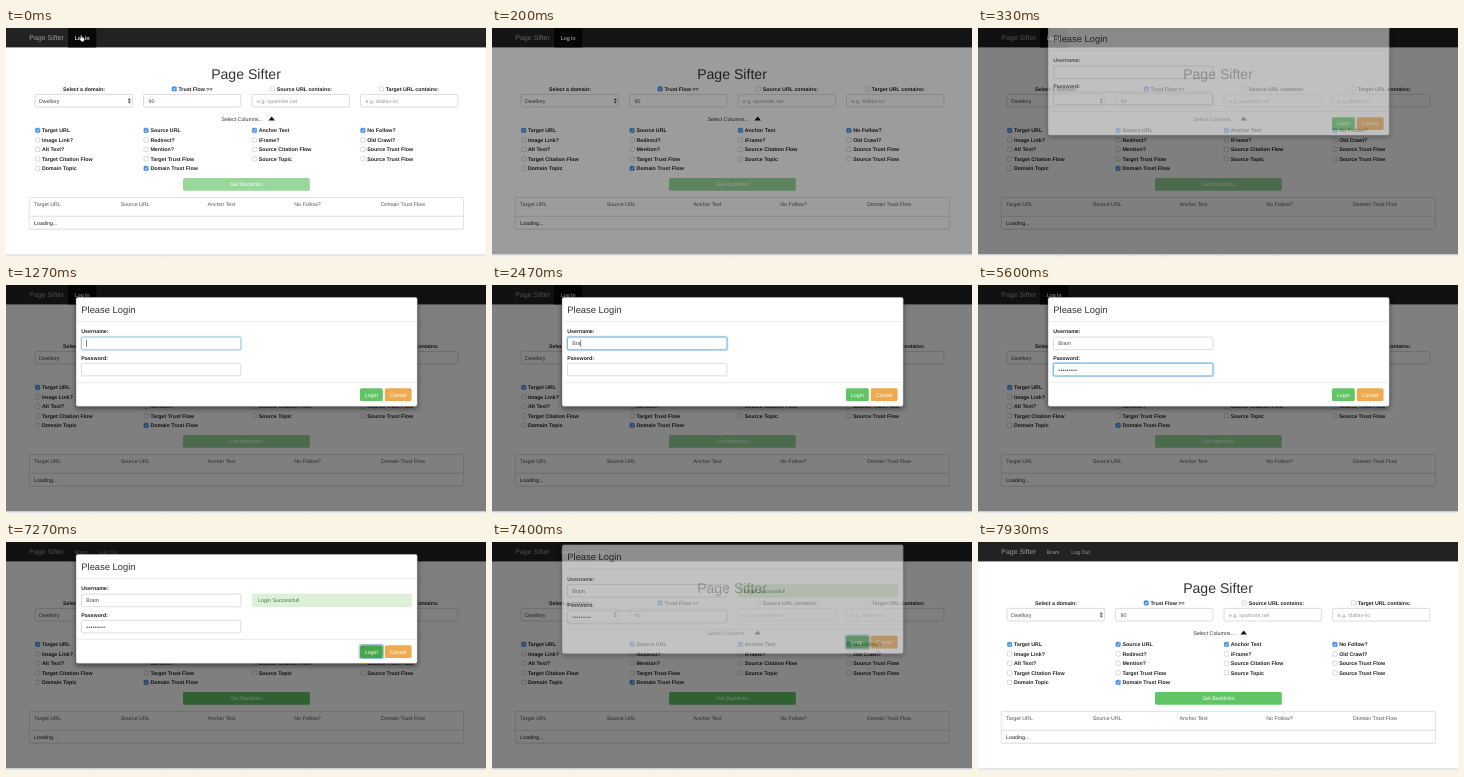
An HTML page for the animation above (8 s loop, 480 px wide and 229 px high).

```html
<!DOCTYPE html>
<html lang="en">
<head>
<meta charset="utf-8">
<title>Login dialog</title>
<style>
  html, body { margin: 0; width: 100%; height: 100%; overflow: hidden; background: #fff; }
  svg { display: block; width: 100vw; height: 100vh; }
  text {
    font: 5.3px "Liberation Sans", Arial, sans-serif;
    text-rendering: geometricPrecision;
    white-space: pre;
  }
  .bold { font-weight: 700; }
  #dialog { filter: drop-shadow(0 2px 2.5px rgba(0, 0, 0, .5)); }
</style>
</head>
<body>
<svg id="stage" viewBox="0 0 480 229" preserveAspectRatio="none">
  <g id="page"></g>
  <rect id="backdrop" width="480" height="226.6" fill="#000"></rect>
  <g id="fade"><g id="dialog"></g></g>
  <g id="footer"></g>
  <path id="hand" d="M74.6 7.6q.7-.8 1.3 0v2l2.1.6q.7.3.5 1.1l-.6 2.1h-2.6l-1.8-2.3q-.3-.9.6-.8l.5.4z"
    fill="#fff" stroke="#222" stroke-width=".4"></path>
</svg>
<script>
const LOOP = 8000;
const GREEN = "#61c465";
const BLUE = "#66afe9";
const $ = id => document.getElementById(id);

function add(parent, tag, attrs, content) {
  const el = document.createElementNS("http://www.w3.org/2000/svg", tag);
  for (const key in attrs) el.setAttribute(key, attrs[key]);
  if (content !== undefined) el.textContent = content;
  parent.appendChild(el);
  return el;
}

const rect = (parent, x, y, width, height, fill, more) =>
  add(parent, "rect", { x, y, width, height, fill, ...more });
const label = (parent, x, y, content, fill = "#333", more) =>
  add(parent, "text", { x, y, fill, ...more }, content);
const bold = (parent, x, y, content, more) =>
  label(parent, x, y, content, "#222", { class: "bold", ...more });
const group = parent => add(parent, "g", {});
const styled = (el, css) => (el.style.cssText = css, el);

function field(parent, x, y, width) {
  return rect(parent, x, y, width, 12.6, "#fff", { rx: 1.5, stroke: "#c4c4c4", "stroke-width": .6 });
}

function checkbox(parent, x, y, checked) {
  rect(parent, x, y, 4.4, 4.4, checked ? "#3f8fee" : "#fff",
    { rx: .9, stroke: checked ? "#3580dd" : "#b5b5b5", "stroke-width": .5 });
  if (checked) {
    add(parent, "path", { d: `M${x + 1} ${y + 2.3}l1 1.1 1.5-2.4`, fill: "none", stroke: "#fff", "stroke-width": .7 });
  }
}

function button(parent, x, y, width, content, fill) {
  const box = rect(parent, x, y, width, 12.8, fill, { rx: 1.5 });
  label(parent, x + width / 2, y + 8.3, content, "#fff", { "text-anchor": "middle" });
  return box;
}

// Page
const page = $("page");
rect(page, 0, 0, 480, 229, "#fff");
rect(page, 0, 0, 480, 19.4, "#222");
styled(label(page, 23.3, 12.4, "Page Sifter", "#9d9d9d"), "font-size:7px");

const guestNav = group(page);
rect(guestNav, 62, 0, 28.3, 19.4, "#080808");
label(guestNav, 68.8, 11.9, "Log In", "#fff", { stroke: "#fff", "stroke-width": .12 });

const userNav = group(page);
label(userNav, 68.8, 11.9, "Bram", "#9d9d9d");
label(userNav, 93.2, 11.9, "Log Out", "#9d9d9d");

styled(label(page, 240, 51, "Page Sifter", "#333", { "text-anchor": "middle" }), "font-size:14.1px");

bold(page, 78, 62.8, "Select a domain:", { "text-anchor": "middle" });
[[166, "Trust Flow >=", true], [264.3, "Source URL contains:"], [373.3, "Target URL contains:"]]
  .forEach(([x, name, on]) => {
    checkbox(page, x, 58.7, on);
    bold(page, x + 6.4, 62.8, name);
  });
[["Dwellory", "#444"], ["90", "#444"], ["e.g. spamsite.net", "#999"], ["e.g. /dallas-tx/", "#999"]]
  .forEach(([value, color], i) => {
    const x = 29 + i * 108.5;
    field(page, x, 66.4, 97.4);
    label(page, x + (i ? 5 : 4), 74.6, value, color);
  });
add(page, "path", { d: "M121.8 72.2l1.5-2 1.5 2zM121.8 73.4l1.5 2 1.5-2z", fill: "#333" });

label(page, 215.4, 92.6, "Select Columns...");
add(page, "path", { d: "M262.4 92.6l3.3-4 3.3 4z", fill: "#111" });

const columns = [
  ["*Target URL", "Image Link?", "Alt Text?", "Target Citation Flow", "Domain Topic"],
  ["*Source URL", "Redirect?", "Mention?", "Target Trust Flow", "*Domain Trust Flow"],
  ["*Anchor Text", "iFrame?", "Source Citation Flow", "Source Topic"],
  ["*No Follow?", "Old Crawl?", "Source Trust Flow", "Source Trust Flow"]
];
columns.forEach((names, c) => names.forEach((name, r) => {
  const x = 29.5 + c * 108.4, y = 100.2 + r * 9.5;
  checkbox(page, x, y, name[0] === "*");
  bold(page, x + 6.5, y + 4.2, name.replace("*", ""));
}));

const backlinks = group(page);
button(backlinks, 177, 150, 126.8, "Get Backlinks", GREEN);

rect(page, 23.2, 169.6, 434.3, 32, "#ddd", { rx: 1 });
rect(page, 23.2, 169.4, 434.3, 31.6, "#fff", { rx: 1, stroke: "#d6d6d6", "stroke-width": .6 });
rect(page, 23.4, 187.8, 434, .7, "#d2d2d2");
["Target URL", "Source URL", "Anchor Text", "No Follow?", "Domain Trust Flow"]
  .forEach((name, i) => label(page, 28.1 + i * 86.7, 178.3, name, "#555"));
label(page, 28.1, 196.9, "Loading...", "#222");

const footer = $("footer");
rect(footer, 0, 226.6, 480, 2.4, "#f3f3f3");
rect(footer, 0, 226.6, 480, .7, "#c9c9c9");
[82, 157, 186, 240, 300].forEach(x => rect(footer, x, 227.2, .6, 1.8, "#d2d2d2"));

// Dialog
const dialog = $("dialog");
rect(dialog, 70, 12.2, 341.3, 109.2, "#fff", { rx: 2, stroke: "#666", "stroke-width": .4 });
styled(label(dialog, 75.3, 28, "Please Login"), "font-size:9.4px");
rect(dialog, 70, 36.2, 341.3, .6, "#e2e2e2");
rect(dialog, 70, 97, 341.3, .6, "#e2e2e2");

function entry(y, name) {
  bold(dialog, 75.2, y - 3.8, name);
  const glow = rect(dialog, 74.9, y - .6, 160.6, 13.8, "none",
    { rx: 2, stroke: BLUE, "stroke-width": 1.6, "stroke-opacity": .4 });
  field(dialog, 75.5, y, 159.4);
  const ring = rect(dialog, 75.5, y, 159.4, 12.6, "none", { rx: 1.5, stroke: BLUE, "stroke-width": .7 });
  const value = label(dialog, 80.3, y + 8.2, "", "#444");
  const caret = rect(dialog, 80.3, y + 2.9, .55, 6.8, "#222");
  return { glow, ring, value, caret };
}
const username = entry(52.1, "Username:");
const password = entry(78.3, "Password:");
password.value.style.letterSpacing = ".27px";

const focusRing = rect(dialog, 353.2, 102.6, 24.4, 14, "none", { rx: 2, stroke: "#7fb6dc", "stroke-width": .9 });
const login = button(dialog, 354, 103.2, 22.8, "Login", GREEN);
button(dialog, 378.8, 103.2, 26.8, "Cancel", "#eeaa50");

const alertBox = group(dialog);
rect(alertBox, 246.3, 52, 159.6, 12.9, "#dff0d8", { rx: 1.5, stroke: "#d2e7c4", "stroke-width": .4 });
label(alertBox, 252, 60.3, "Login Successful!", "#3c763d");

// Motion
const NAME_KEYS = [1930, 2130, 2330, 2530];
const PASS_KEYS = [3300, 3430, 3560, 3900, 4100, 4300, 4600, 4880, 5080];
const ramp = (t, start, length) => Math.min(1, Math.max(0, (t - start) / length));
const pulse = (t, on, off) => ramp(t, on, 150) - ramp(t, off, 150);
const easeOut = k => 1 - (1 - k) ** 1.7;
const show = (el, visible) => el.setAttribute("visibility", visible ? "inherit" : "hidden");
const opacity = (el, value) => el.setAttribute("opacity", value);

function type(entry, content, keys, t, start, end) {
  const pressed = keys.filter(k => k <= t);
  const shown = content.slice(0, pressed.length);
  if (entry.value.textContent !== shown) entry.value.textContent = shown;
  const width = shown ? entry.value.getComputedTextLength() : 0;
  const last = pressed.length ? pressed[pressed.length - 1] : start;
  entry.caret.setAttribute("x", 80.3 + width);
  show(entry.caret, t >= start && t < end && (t - last) % 1000 < 500);
  const focus = pulse(t, start, end);
  opacity(entry.glow, focus);
  opacity(entry.ring, focus);
}

function draw(t) {
  const loggedIn = t >= 6070;
  show(guestNav, !loggedIn);
  show(userNav, loggedIn);
  show($("hand"), t < 200);
  opacity(backlinks, loggedIn ? 1 : .65);

  opacity($("backdrop"), .5 * (ramp(t, 85, 150) - ramp(t, 7490, 150)));
  const visible = ramp(t, 240, 180) - ramp(t, 7330, 150);
  opacity($("fade"), visible);
  show($("fade"), visible > 0);
  const slide = easeOut(ramp(t, 240, 300)) - easeOut(ramp(t, 7330, 300));
  $("fade").setAttribute("transform", `translate(0 ${-26 * (1 - slide)})`);

  type(username, "Bram", NAME_KEYS, t, 1190, 2870);
  type(password, "•".repeat(9), PASS_KEYS, t, 2870, 5730);

  const pressed = t >= 5730;
  login.setAttribute("fill", pressed ? "#47a64a" : GREEN);
  show(focusRing, pressed);
  opacity(alertBox, ramp(t, 6070, 150));
}

function tick(now) {
  draw(now % LOOP);
  requestAnimationFrame(tick);
}
draw(0);
requestAnimationFrame(tick);
</script>
</body>
</html>
```
